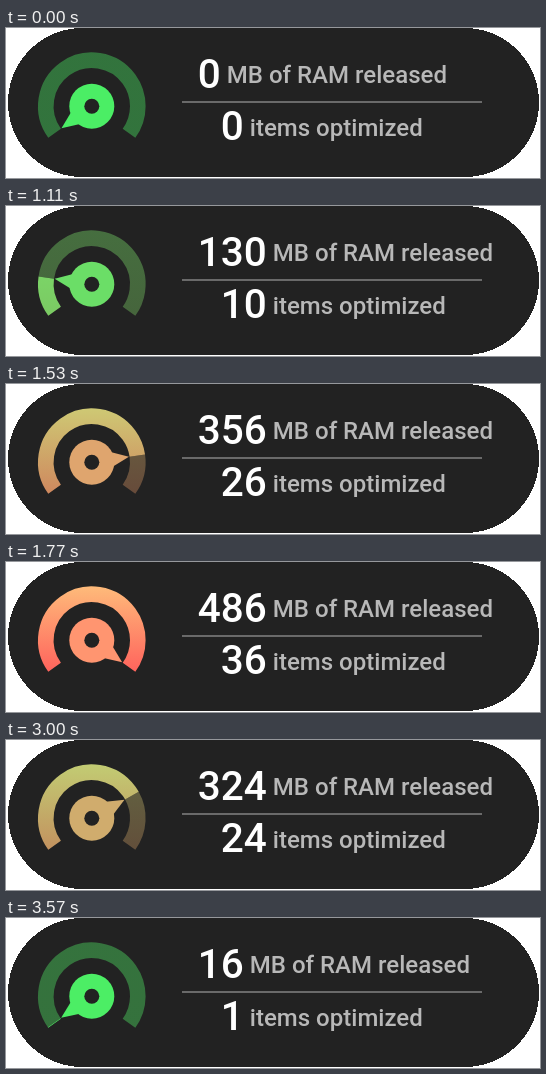
Write an HTML page with a canvas that moves like this. It is 534 px wide and 150 px high and loops after 3600 ms.

```html
<!DOCTYPE html>
<html lang="en">
<head>
<meta charset="utf-8">
<title>Memory gauge</title>
<style>
  html, body { margin: 0; width: 100%; height: 100%; overflow: hidden; background: #fff; }
  canvas { display: block; }
</style>
</head>
<body>
<canvas id="stage" width="534" height="150"></canvas>
<script>
const ctx = document.getElementById("stage").getContext("2d");

const LOOP = 3600, TICK = 30, STEPS = 30;
const RISE_AT = 900, FLASH_AT = 2730;
const MAX_MB = 486, MAX_ITEMS = 36;

const CX = 85.8, CY = 78.2;
const START = 144 * Math.PI / 180, SWEEP = 252 * Math.PI / 180;
const PANEL = "#222222";
const GREEN = [75, 238, 101];
const TOP_END = [254, 187, 122], BOTTOM_END = [255, 98, 92], NEEDLE_END = [255, 149, 112];

const mix = (to, p) => `rgb(${GREEN.map((c, i) => Math.round(c + (to[i] - c) * p))})`;
const smooth = p => p * p * (3 - 2 * p);

// Counter position, 0 to STEPS, on a 30 ms clock
function stepAt(time) {
  if (time < RISE_AT) return 0;
  if (time < FLASH_AT) return Math.min(STEPS, Math.floor((time - RISE_AT) / TICK) + 1);
  return STEPS - 1 - Math.floor((time - FLASH_AT) / TICK);
}

// Pill with hard, unsmoothed edges, one row at a time
function drawPanel() {
  const radius = 74.5;
  ctx.fillStyle = PANEL;
  for (let y = 0; y < 149; y++) {
    const inset = Math.round(radius - Math.sqrt(radius ** 2 - (y + 0.5 - radius) ** 2));
    ctx.fillRect(2 + inset, y, 531 - 2 * inset, 1);
  }
  ctx.fillStyle = "#828282";
  ctx.fillRect(176, 73.25, 300, 1.5);
}

function strokeArc(from, to, alpha) {
  ctx.globalAlpha = alpha;
  ctx.beginPath();
  ctx.arc(CX, CY, 46, from, to);
  ctx.stroke();
  ctx.globalAlpha = 1;
}

function disc(radius, color) {
  ctx.fillStyle = color;
  ctx.beginPath();
  ctx.arc(CX, CY, radius, 0, Math.PI * 2);
  ctx.fill();
}

function drawGauge(p) {
  const eased = smooth(p);
  const angle = START + SWEEP * eased;
  const shade = ctx.createLinearGradient(0, 24, 0, 111);
  shade.addColorStop(0, mix(TOP_END, p));
  shade.addColorStop(1, mix(BOTTOM_END, p));
  ctx.strokeStyle = shade;
  ctx.lineWidth = 15.6;
  if (p < 1) strokeArc(angle, START + SWEEP, 0.4);
  if (p > 0) strokeArc(START, angle, 1);

  const needle = mix(NEEDLE_END, eased);
  ctx.save();
  ctx.translate(CX, CY);
  ctx.rotate(angle);
  ctx.fillStyle = needle;
  ctx.beginPath();
  ctx.moveTo(37.5, 0);
  ctx.lineTo(20, 7.5);
  ctx.lineTo(20, -7.5);
  ctx.fill();
  ctx.restore();

  disc(22.5, needle);
  disc(7.5, PANEL);
}

function drawCount(value, label, x, y) {
  ctx.font = "500 40.5px Roboto, sans-serif";
  ctx.fillStyle = "#fff";
  ctx.fillText(value, x, y);
  const width = ctx.measureText(value).width;
  ctx.font = "500 24px Roboto, sans-serif";
  ctx.fillStyle = "#b8b8b8";
  ctx.fillText(" " + label, x + width, y - 4.5);
}

function draw(time) {
  ctx.fillStyle = "#fff";
  ctx.fillRect(0, 0, 534, 150);
  if (time >= FLASH_AT && time < FLASH_AT + TICK) return;
  const p = stepAt(time) / STEPS;
  drawPanel();
  drawGauge(p);
  drawCount(Math.round(MAX_MB * p), "MB of RAM released", 191.8, 59.6);
  drawCount(Math.round(MAX_ITEMS * p), "items optimized", 214.8, 112.1);
}

const began = performance.now();
function frame() {
  draw((performance.now() - began) % LOOP);
  requestAnimationFrame(frame);
}
frame();
</script>
</body>
</html>
```
